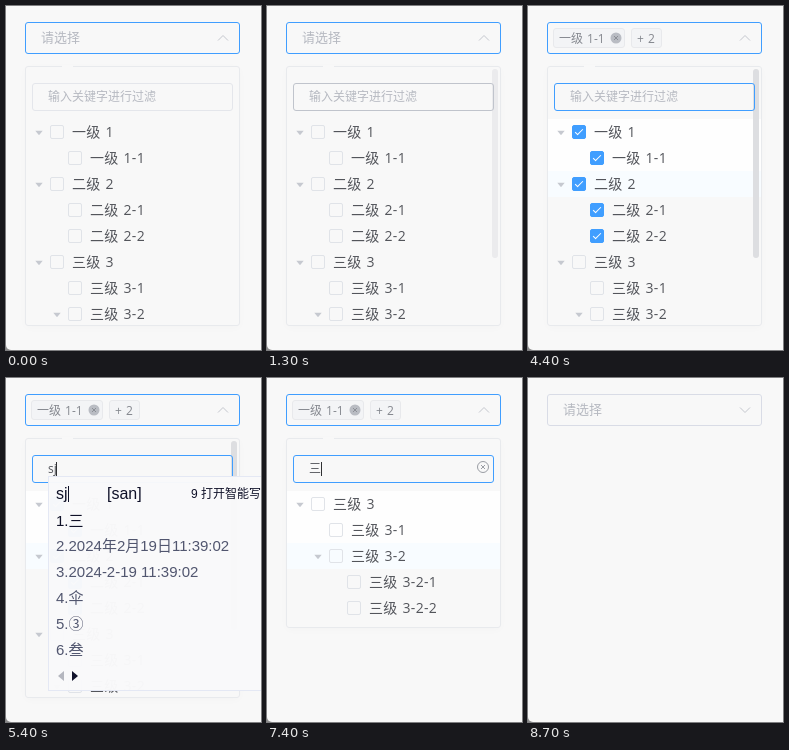
Write an HTML page that moves like this. It is 255 px wide and 344 px high and loops after 9100 ms.

```html
<!DOCTYPE html>
<html lang="zh">
<head>
<meta charset="utf-8">
<style>
html, body { margin: 0; width: 100%; height: 100%; overflow: hidden; background: #8c8c8c; }
#stage { position: absolute; left: 0; top: 0; width: 255px; height: 344px; overflow: hidden;
  background: #f8f8f8; border-bottom-left-radius: 5px;
  font-family: "Open Sans", "Noto Sans CJK SC", "Noto Sans CJK", sans-serif; color: #53555b; }
#stage div { position: absolute; box-sizing: border-box; white-space: pre; }
svg { position: absolute; overflow: visible; fill: none; }
.layer { left: 0; top: 0; width: 255px; height: 344px; }
.field { border: 1px solid; border-radius: 3px; }
.hint { color: #b6b9c1; }
.frame { border: 1px solid #e8eaed; border-radius: 3px; box-shadow: 0 2px 8px rgba(0,0,0,.02); }
.clip { overflow: hidden; }
.label { font-size: 14px; line-height: 26px; letter-spacing: .3px; word-spacing: 1px; }
.box { width: 14px; height: 14px; border: 1px solid #e0e3e8; border-radius: 2px; }
.box.hover { border-color: #409eff; }
.box.on { border-color: #409eff; background: #409eff; }
.box.on::after { content: ""; position: absolute; left: 4px; top: 1px; width: 3px; height: 7px;
  border: solid #fff; border-width: 0 1px 1px 0; transform: rotate(45deg); }
.tag { height: 20px; border: 1px solid #e8e9ec; border-radius: 3px; background: #f3f4f6;
  color: #85888f; font-size: 12px; line-height: 19px; padding-left: 5px; word-spacing: 1px; }
.bar { border-radius: 3px; }
.ime { background: rgba(249,249,250,.98); border: 1px solid #e4e8f4; }
.ime div { font: 15px/26px "Liberation Sans", "Noto Sans CJK SC", "Noto Sans CJK", sans-serif; color: #51566f; }
.ime .dark { color: #0f1128; }
.ime .large { font-size: 16px; }
.ime .small { font-size: 12px; }
</style>
</head>
<body>
<div id="stage"></div>
<script>
const LOOP = 9100, TICK = 100;
const stage = document.getElementById('stage');

function add(parent, cls, x, y, w, h, text) {
  const node = document.createElement('div');
  node.className = cls;
  Object.assign(node.style, { left: x + 'px', top: y + 'px' });
  if (w) node.style.width = w + 'px';
  if (h) node.style.height = h + 'px';
  if (text) node.textContent = text;
  parent.append(node);
  return node;
}

// Icons are drawn around their own centre.
function icon(parent, x, y, path, style) {
  const svg = document.createElementNS('http://www.w3.org/2000/svg', 'svg');
  const shape = document.createElementNS(svg.namespaceURI, 'path');
  shape.setAttribute('d', path);
  Object.assign(svg.style, { left: x + 'px', top: y + 'px', width: '1px', height: '1px', transformOrigin: '0 0' }, style);
  svg.append(shape);
  parent.append(svg);
  return svg;
}

const CHEVRON = 'M-5 2.5L0-2.5L5 2.5';
const CIRCLE = 'M-5.5 0a5.5 5.5 0 1 0 11 0a5.5 5.5 0 1 0-11 0';
const CROSS = 'M-2-2L2 2M2-2L-2 2';
const EXPANDED = 'M-3.7-2.2H3.7L0 2.2Z';

// Select field
const select = add(stage, 'field', 19, 16, 215, 32);
const selectHint = add(stage, 'hint', 35, 16, 0, 0, '请选择');
selectHint.style.font = '13px/29px "Noto Sans CJK SC", "Noto Sans CJK", sans-serif';
const tag = add(stage, 'tag', 25, 22, 72, 0, '一级 1-1');
icon(tag, 62, 9, CIRCLE, { fill: '#b9bcc3' });
icon(tag, 62, 9, CROSS, { stroke: '#8c8f96' });
const moreTag = add(stage, 'tag', 103, 22, 31, 0, '+ 2');
const chevron = icon(stage, 216.5, 32, CHEVRON, { stroke: '#c4c7ce' });
const selectClear = icon(stage, 216, 31.5, CIRCLE + CROSS, { stroke: '#c0c4cc' });

// Dropdown
const drop = add(stage, 'layer', 0, 0);
drop.style.transformOrigin = '0 60px';
const frame = add(drop, 'frame', 19, 60, 215, 260);
add(drop, '', 56, 59, 11, 3).style.background = '#f8f8f8';
const clip = add(drop, 'clip', 20, 61, 213, 258);
const bands = [0, 1, 2].map(i => add(clip, '', 0, 52 + i * 26, 213, 26));

function tree(rows) {
  const list = add(clip, '', 0, 52, 213, 0);
  const boxes = rows.map(([text, depth, parent], i) => {
    const x = depth * 18, y = i * 26;
    if (parent) icon(list, x + 12.5, y + 13.7, EXPANDED, { fill: '#c6c9d0' });
    add(list, 'label', x + 46, y, 0, 0, text);
    return add(list, 'box', x + 24, y + 6);
  });
  return { list, boxes };
}
const third = [['三级 3', 0, true], ['三级 3-1', 1], ['三级 3-2', 1, true]];
const full = tree([['一级 1', 0, true], ['一级 1-1', 1],
  ['二级 2', 0, true], ['二级 2-1', 1], ['二级 2-2', 1], ...third]);
const filtered = tree([...third, ['三级 3-2-1', 2], ['三级 3-2-2', 2]]);

const bar = add(drop, 'bar', 225, 63, 6, 189);
const filter = add(drop, 'field', 26, 77, 201, 28);
const filterText = add(drop, '', 42, 77);
filterText.style.fontSize = '12px';
filterText.style.lineHeight = '27px';
const caret = add(drop, '', 42, 84, 1, 14);
caret.style.background = '#303133';
const filterClear = icon(drop, 215.5, 88.5, CIRCLE + CROSS, { stroke: '#9a9da4' });

// Input method window
const ime = add(stage, 'ime', 42, 98, 220, 215);
const imeText = add(ime, 'dark large', 7, 4);
const imeCaret = add(ime, '', 19, 9, 1, 16);
imeCaret.style.background = '#0f1128';
add(ime, 'dark large', 58, 4, 0, 0, '[san]');
add(ime, 'dark small', 142, 4, 0, 0, '9 打开智能写');
['三', '2024年2月19日11:39:02', '2024-2-19 11:39:02', '伞', '③', '叁'].forEach((word, i) =>
  add(ime, i ? '' : 'dark', 7, 30.5 + i * 25.8, 0, 0, `${i + 1}.${word}`));
icon(ime, 12, 199, 'M3-5V5L-3 0Z', { fill: '#b5b7bf' });
icon(ime, 26, 199, 'M-3-5V5L3 0Z', { fill: '#11132b' });

const steps = {
  selectBorder: [[0, '#409eff'], [8400, '#d9dce6']],
  filterBorder: [[0, '#e4e6eb'], [200, '#c0c4cc'], [4000, '#409eff']],
  bar: [[0, ''], [1200, '#ebebed'], [1500, '#dddee1'], [5500, ''], [7500, '#dddee1'], [8200, '']],
  value: [[0, ''], [4900, 's'], [5000, 'sj'], [5500, '三'], [7500, '']],
  caret: [[0, 0], [4100, 1], [4400, 0], [4900, 1], [6000, 0], [6400, 1], [6900, 0], [7400, 1], [7900, 0]],
  first: [[0, ''], [1900, ' hover'], [2100, ' on']],
  second: [[0, ''], [2500, ' hover'], [2700, ' on']],
  bands: [
    [[0, ''], [1900, '#f4f6f9'], [4100, '#fefefe']],
    [[0, ''], [2100, '#fefefe']],
    [[0, ''], [2500, '#f8fcff']],
  ],
};
const at = (t, list) => list.reduce((value, [time, next]) => t >= time ? next : value, list[0][1]);
const between = (t, from, to) => t >= from && t < to;
const show = (node, visible) => { node.style.display = visible ? '' : 'none'; };

// Each toggle eases out over 300 ms.
function openness(t) {
  const ease = start => 1 - (1 - Math.min(1, Math.max(0, (t - start) / 300))) ** 4;
  return 1 - ease(450) + ease(950) - ease(8350);
}

function render(t) {
  const open = openness(t);
  const value = at(t, steps.value);
  const narrowed = between(t, 5500, 7500);

  select.style.borderColor = at(t, steps.selectBorder);
  show(selectHint, !between(t, 2200, 8400));
  show(tag, between(t, 2200, 8400));
  show(moreTag, between(t, 2800, 8400));
  show(selectClear, between(t, 8200, 8400));
  show(chevron, !between(t, 8200, 8400));
  chevron.style.transform = `rotate(${180 * (1 - open)}deg)`;

  show(drop, open > 0.001);
  drop.style.opacity = open;
  drop.style.transform = `scaleY(${open})`;
  frame.style.height = (narrowed ? 190 : 260) + 'px';
  clip.style.height = (narrowed ? 188 : 258) + 'px';
  show(full.list, !narrowed);
  show(filtered.list, narrowed);
  bands.forEach((band, i) => { band.style.background = at(t, steps.bands[i]); });
  bar.style.background = at(t, steps.bar);

  const first = at(t, steps.first), second = at(t, steps.second);
  full.boxes.forEach((box, i) => {
    const state = i < 2 ? first : i < 5 ? second : '';
    const child = i !== 0 && i !== 2;
    box.className = 'box' + (child && state === ' hover' ? '' : state);
  });

  filter.style.borderColor = at(t, steps.filterBorder);
  filterText.textContent = value || '输入关键字进行过滤';
  filterText.style.color = value ? '#53555b' : '#b6b9c1';
  show(caret, at(t, steps.caret));
  caret.style.left = { '': 42, s: 48, sj: 50, 三: 54 }[value] + 'px';
  show(filterClear, between(t, 7000, 7500));

  show(ime, between(t, 4900, 5500));
  imeText.textContent = value;
  imeCaret.style.left = (value === 's' ? 15 : 19) + 'px';
}

const start = performance.now();
function tick() {
  const t = (performance.now() - start) % LOOP;
  render(Math.floor(t / TICK) * TICK);
  requestAnimationFrame(tick);
}
tick();
</script>
</body>
</html>
```
